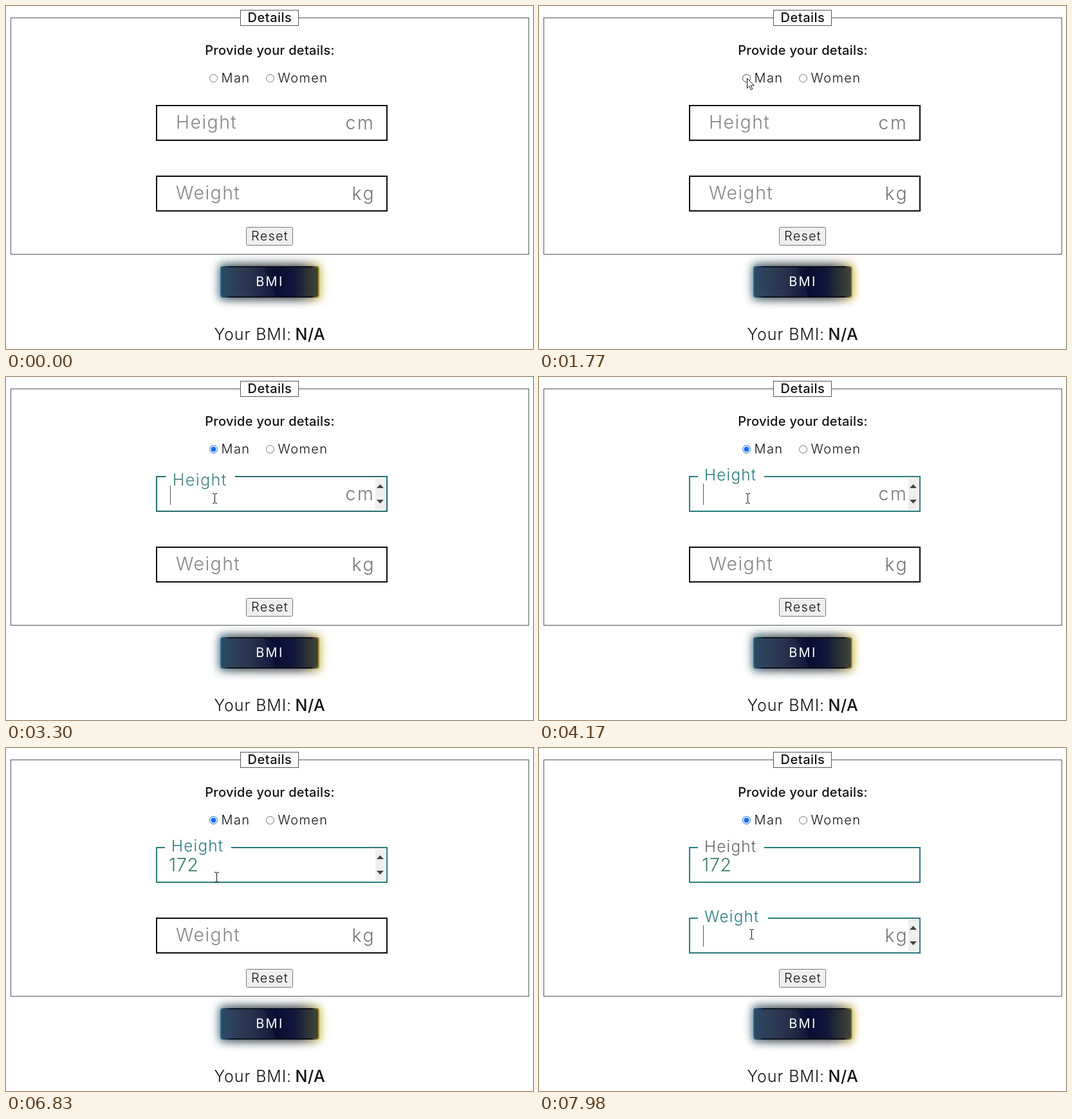
Animation of 819x534 px, one loop 8000 ms. Source, as an HTML page:

```html
<!DOCTYPE html>
<html lang="en">
<head>
<meta charset="utf-8">
<title>BMI form</title>
<style>
html, body { margin: 0; width: 100%; height: 100%; overflow: hidden; background: #fff; }
svg { display: block; width: 819px; height: 534px; }
text { font: 300 20px Inter, "Open Sans", sans-serif; letter-spacing: .07em; fill: #111; white-space: pre; }
.mid { text-anchor: middle; }
.medium { font-weight: 500; letter-spacing: .025em; }
.big { font-size: 28.5px; letter-spacing: .045em; }
.result { font-size: 25px; letter-spacing: .035em; }
.unit { fill: #757575; letter-spacing: .09em; }
.value { fill: #3a7a6c; letter-spacing: .025em; }
.line { fill: none; stroke: #555; }
.radio { fill: #fff; stroke: #767676; }
</style>
</head>
<body>
<svg viewBox="0 0 819 534">
  <defs>
    <linearGradient id="face">
      <stop offset="0" stop-color="#24435c"/>
      <stop offset=".28" stop-color="#222d48"/>
      <stop offset=".56" stop-color="#090d33"/>
      <stop offset=".74" stop-color="#11163a"/>
      <stop offset="1" stop-color="#434936"/>
    </linearGradient>
    <linearGradient id="edge">
      <stop offset="0" stop-color="#2a6c94"/>
      <stop offset=".1" stop-color="#0b1420"/>
      <stop offset=".92" stop-color="#0b0c18"/>
      <stop offset="1" stop-color="#b0963a"/>
    </linearGradient>
    <linearGradient id="halo">
      <stop offset="0" stop-color="#2c5a6a"/>
      <stop offset=".2" stop-color="#1a2a32"/>
      <stop offset=".8" stop-color="#222428"/>
      <stop offset=".93" stop-color="#8a8040"/>
      <stop offset="1" stop-color="#f5d83c"/>
    </linearGradient>
    <filter id="blur" x="-20%" y="-60%" width="140%" height="220%"><feGaussianBlur stdDeviation="7"/></filter>
  </defs>

  <rect class="line" x="7.5" y="18.5" width="805" height="368"/>
  <rect class="line" x="364.5" y="6.5" width="90" height="24" style="fill:#fff"/>
  <text class="mid medium" x="410" y="25">Details</text>
  <text class="mid medium" x="410" y="76" style="letter-spacing:.015em">Provide your details:</text>

  <circle class="radio" id="man" cx="322.5" cy="112.5" r="6"/>
  <circle id="dot" cx="322.5" cy="112.5" r="4" fill="#1b6ee8"/>
  <text x="334.5" y="119">Man</text>
  <circle class="radio" id="women" cx="410.5" cy="112.5" r="6"/>
  <text x="422.5" y="119">Women</text>

  <g id="fields"></g>

  <rect x="373.5" y="344.5" width="72" height="28" rx="2" fill="#efefef" stroke="#767676"/>
  <text class="mid" x="410" y="365" style="letter-spacing:.06em">Reset</text>

  <rect x="331" y="401" width="159" height="57" rx="6" fill="url(#halo)" filter="url(#blur)" opacity=".85"/>
  <rect x="334" y="406" width="152" height="47" rx="3" fill="url(#face)" stroke="url(#edge)" stroke-width="2"/>
  <path d="M335 407H401L420 452H335Z" fill="#fff" opacity=".04"/>
  <text class="mid" x="410" y="436" style="fill:#fff;font-weight:400;letter-spacing:.12em">BMI</text>

  <text class="result" x="323.5" y="520">Your BMI:</text>
  <text class="result" x="449.5" y="520" style="font-weight:500;letter-spacing:.02em">N/A</text>

  <circle id="click" r="11.5" fill="#fbf54a" opacity=".75"/>
  <path id="arrow" d="M.5 .5V16L4 12.6L6.4 18.3L8.8 17.3L6.4 11.8H11.3Z" fill="#fff" stroke="#111"/>
  <path id="beam" d="M-3 -7.5H-1L.5 -6.5L2 -7.5H4M.5 -6.5V6.5M-3 7.5H-1L.5 6.5L2 7.5H4" fill="none" stroke="#111"/>
</svg>
<script>
const LOOP = 8000, STEP = 67;
const $ = id => document.getElementById(id);
const show = (el, on) => el.setAttribute('display', on ? 'inline' : 'none');
const set = (el, attrs) => { for (const k in attrs) el.setAttribute(k, attrs[k]); };
const mix = (a, b, p) => a + (b - a) * p;
const mixColor = (a, b, p) => `rgb(${a.map((v, i) => Math.round(mix(v, b[i], p)))})`;
const within = (t, from, to) => t >= from && t < to;
const TEAL = [42, 122, 125], BLACK = [12, 12, 12], GRAY = [132, 132, 132];

function makeField(name, unit, unitX, y, notch) {
  const g = document.createElementNS('http://www.w3.org/2000/svg', 'g');
  g.setAttribute('transform', `translate(0 ${y})`);
  g.innerHTML = `
    <rect class="box" x="234" y="1" width="358" height="54" fill="#fff" stroke-width="2"/>
    <g class="spin"><path d="M574 3H589V53H574Z" fill="#efefef"/>
      <path d="M576 19L581.500 13L587 19ZM576 37H587L581.500 43Z" fill="#444"/></g>
    <text class="big unit" x="${unitX}" y="38">${unit}</text>
    <path class="caret" d="M.5 12V45" stroke="#555"/>
    <rect class="gap" y="-1" fill="#fff"/>
    <text class="label">${name}</text>
    <text class="big value" x="253" y="38"></text>`;
  $('fields').append(g);
  const part = c => g.querySelector('.' + c);
  return { notch, box: part('box'), spin: part('spin'), unit: part('unit'), gap: part('gap'),
    label: part('label'), value: part('value'), caret: part('caret') };
}
const height = makeField('Height', 'cm', 527.5, 154, [120, 103]);
const weight = makeField('Weight', 'kg', 537.5, 264, [128, 109]);

function focusAmount(t, start) {
  if (t < start) return 0;
  const p = Math.min(1, (STEP + Math.floor((t - start) / STEP) * STEP) / 400);
  return p * p * (3 - 2 * p);
}

function drawField(f, t, start, s) {
  const p = focusAmount(t, start);
  f.box.setAttribute('stroke', mixColor(BLACK, TEAL, Math.sqrt(p)));
  show(f.gap, t >= start);
  set(f.gap, { x: mix(253, 247, p), width: mix(f.notch[0], f.notch[1], p), height: mix(31, 11, p) });
  set(f.label, { x: mix(264, 257, p), y: mix(37, 7, p) + (s.blurred ? 1 : 0) });
  f.label.style.cssText = `font-size:${mix(28.5, 24.3, p)}px;letter-spacing:.05em;fill:` +
    (s.blurred ? '#666' : mixColor(GRAY, TEAL, p));
  f.value.textContent = s.value;
  show(f.unit, !s.value);
  show(f.spin, s.spin);
  show(f.caret, s.caret);
  f.caret.setAttribute('transform', `translate(${[255, 265, 281, 297][s.value.length]} 0)`);
}

// Pointer path: time, x, y
const path = [
  [500, 659, 140], [570, 560, 126], [640, 499, 118], [710, 456, 113], [780, 434, 112],
  [1000, 381, 112], [1240, 337, 112], [1380, 327, 112], [1580, 325, 112], [1710, 323, 112],
  [2440, 322, 118], [2570, 318, 150], [2700, 320, 184], [2770, 324, 189],
  [6830, 327, 201], [6900, 327, 230], [6970, 328, 268], [7030, 328, 291],
  [7230, 329, 291], [7300, 330, 290]
];
function pointerAt(t) {
  const i = path.findLastIndex(k => k[0] <= t);
  if (i < 0) return null;
  const a = path[i], b = path[i + 1];
  const moving = b && b[0] - a[0] <= 250 && a[0] !== 7030 && a[0] !== 1380;
  const p = moving ? Math.floor((t - a[0]) / STEP) * STEP / (b[0] - a[0]) : 0;
  return { x: Math.round(mix(a[1], b ? b[1] : 0, p)), y: Math.round(mix(a[2], b ? b[2] : 0, p)) };
}

const typed = [5040, 5500, 6300];
const blink = [[3100, 3630], [4170, 4700], [5040, 6030], [6300, 6830], [7370, 7640]];

function draw(t) {
  const m = pointerAt(t);
  const over = (x0, x1, y0, y1) => !!m && m.x >= x0 && m.x < x1 && m.y >= y0 && m.y < y1;
  const inHeight = over(233, 593, 154, 210), inWeight = over(233, 593, 264, 320);
  const heightFocus = within(t, 3100, 7640), weightFocus = t >= 7640;

  drawField(height, t, 3100, {
    value: '172'.slice(0, typed.filter(k => t >= k).length),
    spin: heightFocus || inHeight,
    caret: blink.some(b => within(t, ...b)),
    blurred: weightFocus
  });
  drawField(weight, t, 7640, { value: '', spin: weightFocus || inWeight, caret: weightFocus });

  const checked = t >= 1910;
  show($('dot'), checked);
  $('man').style.stroke = checked ? '#1b6ee8' : over(316, 379, 104, 122) ? '#444' : '#767676';
  $('women').style.stroke = over(404, 503, 104, 122) ? '#333' : '#767676';

  const beam = inHeight || inWeight;
  show($('arrow'), m && !beam);
  show($('beam'), beam);
  show($('click'), within(t, 1840, 1910) || within(t, 3100, 3230) || within(t, 7640, 7780));
  if (m) {
    const at = { transform: `translate(${m.x} ${m.y})` };
    set($('arrow'), at);
    set($('beam'), at);
    set($('click'), { cx: m.x - 3, cy: m.y - 1 });
  }
}

function tick() {
  draw(performance.now() % LOOP);
  requestAnimationFrame(tick);
}
tick();
</script>
</body>
</html>
```
